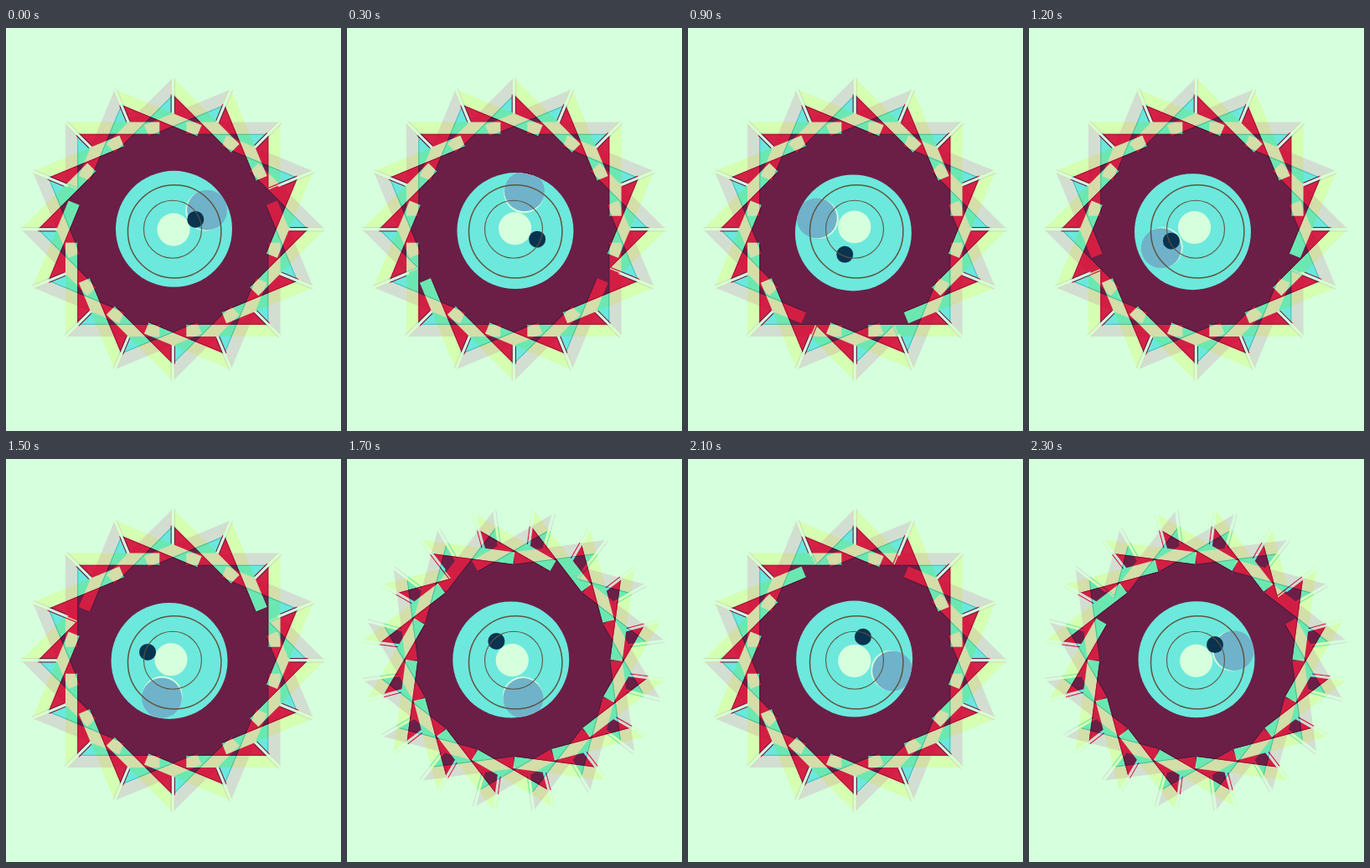
These frames come from a looping animation (400 by 482 pixels, 2400 ms). An HTML page:

```html
<!DOCTYPE html>
<html lang="en">
<head>
<meta charset="utf-8">
<title>Counter-rotating wheels</title>
<style>
  html, body { margin: 0; width: 100%; height: 100%; overflow: hidden; background: #d5ffdd; }
  svg { display: block; width: 100vw; height: 100vh; }
  .wheel { mix-blend-mode: multiply; }
  .warm { --fill: #ff2250; --rim: #ffffcd; --shade: #c81440; }
  .cool { --fill: #80e8ff; --rim: #fddef3; --shade: #5cbcd8; }
  .fill { fill: var(--fill); }
  .rim { fill: var(--rim); }
  .shade { fill: none; stroke: var(--shade); }
  .edge { stroke-width: 1.3; }
  .line { fill: none; stroke: #5f553e; }
</style>
</head>
<body>
<svg viewBox="0 0 400 482">
  <defs>
    <!-- one blade: tip at the upper left, long edge pointing at the hub -->
    <g id="blade">
      <path class="rim" d="M-128.3-128.3H-16V-113H-113Z"/>
      <path class="fill" d="M-114-114H-16V-16Z"/>
      <path class="shade" d="M-112-113.5H-16"/>
      <path class="edge" stroke="var(--rim)" d="M-129.7-126.8L-115.5-112.6"/>
      <path class="edge" stroke="var(--fill)" d="M-115.5-112.6L-62-59.1"/>
      <path stroke="#fff" stroke-width="3" d="M-128.3-128.3L-96-96"/>
    </g>
    <clipPath id="inside"><use href="#disc"/></clipPath>
  </defs>
  <g transform="translate(199.3 240.8)">
    <g class="wheel warm"><circle class="fill" r="112"/></g>
    <g class="wheel cool"><circle class="fill" r="112"/></g>
  </g>
  <circle id="disc" r="69.5" fill="#6de8dd"/>
  <circle id="hub" r="19.6" fill="#d5ffdd"/>
  <g clip-path="url(#inside)">
    <circle id="glint" r="24" fill="#d5ffdd"/>
    <circle id="moon" r="24" fill="#70b2ca"/>
  </g>
  <circle id="dot" r="10" fill="#0a3350"/>
  <circle class="line" cx="199" cy="240.7" r="34.5" stroke-width="1.1"/>
  <circle class="line" cx="201.2" cy="243.4" r="55.7" stroke-width="1.5"/>
</svg>
<script>
  const LOOP = 2400, STEP = 100, BLADES = 16;
  const $ = id => document.getElementById(id);
  const wheels = [...document.querySelectorAll('.wheel')];

  // Each blade lies over the one before it, so the last one leaves a seam.
  for (const wheel of wheels)
    for (let i = 0; i < BLADES; i++)
      wheel.innerHTML += `<use href="#blade" transform="rotate(${90 - i * 360 / BLADES})"/>`;

  function orbit(id, cx, cy, radius, degrees) {
    const a = degrees * Math.PI / 180;
    $(id).setAttribute('cx', cx + radius * Math.cos(a));
    $(id).setAttribute('cy', cy + radius * Math.sin(a));
  }

  function draw() {
    const time = Math.floor(performance.now() % LOOP / STEP) * STEP;
    const turn = 360 * time / LOOP;
    wheels[0].setAttribute('transform', `rotate(${turn})`);
    wheels[1].setAttribute('transform', `scale(-1 1) rotate(${turn})`);
    orbit('disc', 198, 242, 3, turn - 33);
    orbit('hub', 198.8, 239.8, 1.8, 45 - turn);
    orbit('glint', 199, 240.5, 45, -29 - turn);
    orbit('moon', 199, 240.5, 47, -29 - turn);
    orbit('dot', 198.1, 241.8, 31, turn - 24.5);
    requestAnimationFrame(draw);
  }
  draw();
</script>
</body>
</html>
```
